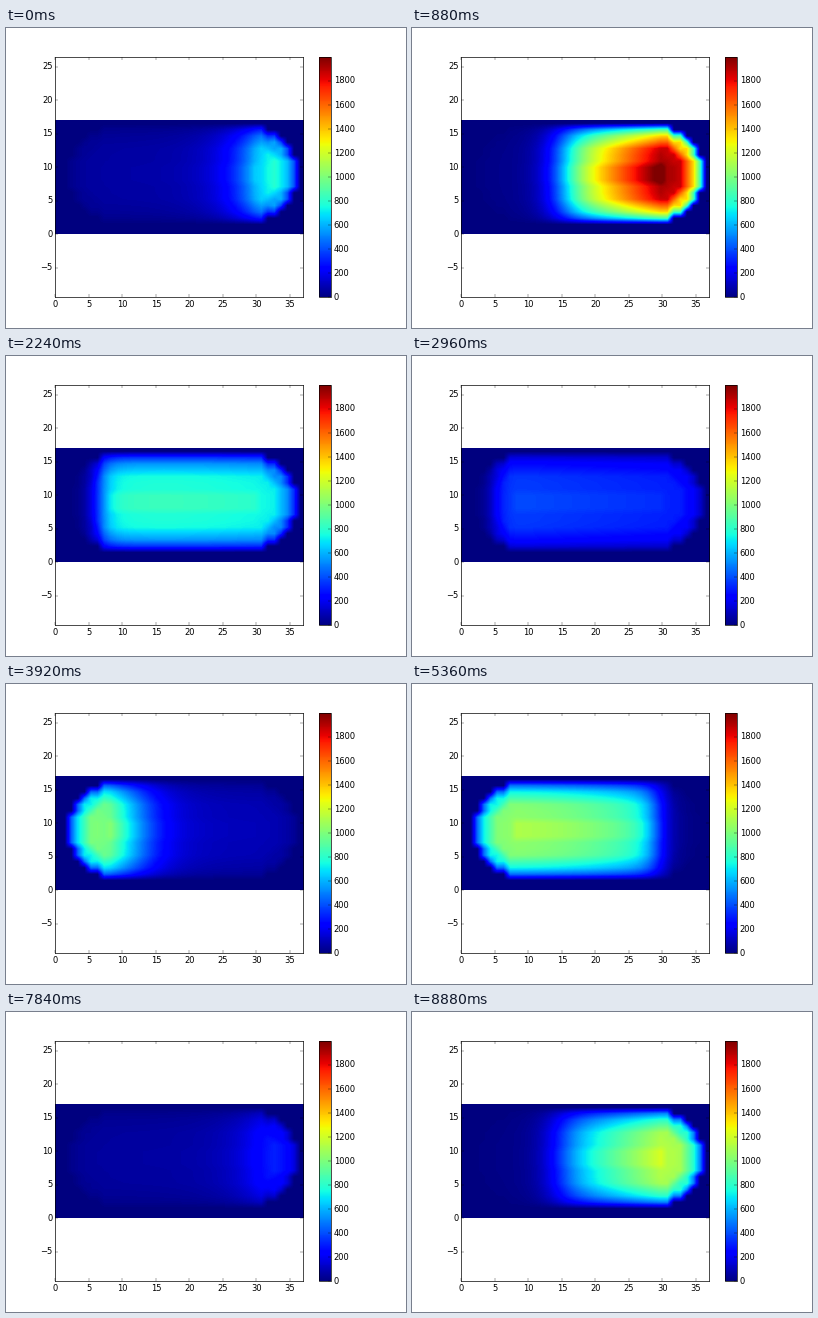
Animation of 400x300 px, one loop 8.96 s. Source, as a matplotlib script:

```python
import numpy as np
import matplotlib.pyplot as plt
from matplotlib.animation import FuncAnimation

plt.style.use("classic")
plt.rcParams.update({
    "figure.facecolor": "white",
    "savefig.dpi": "figure",
    "font.family": "DejaVu Sans",
})

FRAMES, INTERVAL = 112, 80
W, H = 400, 300
COLS, ROWS = 38, 18
MID_COL, MID_ROW = 19, 9
VMAX = 1996

# (start, peak) of each burst; they set off from left and right in turn
BURSTS = [(-50, 1500), (0, 2050), (46.3, 1540), (99.5, 1200)]

col = np.arange(COLS)
row = np.arange(ROWS)[:, None]


def capsule():
    """Static weight of each cell, falling in bands towards the rim."""
    over = np.maximum(np.abs(col - MID_COL) - 10, 0)
    depth = np.round(np.hypot(over, row - MID_ROW))
    band = (depth + 1) // 3
    return np.clip(1 - 0.07 * band - 0.86 * (depth / 8) ** 5, 0, 1)


def burst(age, peak, side):
    """Level along the length: a front slows down while the rest decays."""
    s = 11 + side * (col - MID_COL)
    front = 27 * (1 - np.exp(-age / 13))
    soft = 0.7 + 2.7 * np.exp(-age / 12)
    run = np.maximum(s, 0)
    level = peak * np.exp(-run / 32) / np.cosh((age - 12 - 0.4 * run) / 10)
    return level / (1 + np.exp((s - front) / soft))


MASK = capsule()


def field(t):
    return MASK * sum(burst(t - start, peak, (-1) ** n)
                      for n, (start, peak) in enumerate(BURSTS))


def add_axes(x, y, w, h):
    return fig.add_axes([x / W, y / H, w / W, h / H])


fig = plt.figure(figsize=(W / 50, H / 50), dpi=50)
ax = add_axes(49.4, 30.6, 248, 240)
image = ax.imshow(field(0), cmap="jet", vmin=0, vmax=VMAX, origin="lower",
                  extent=(0, 37, 0, 17), aspect="auto",
                  interpolation="bilinear")
half = 18.5 * 240 / 248
ax.set_xlim(0, 37)
ax.set_ylim(8.5 - half, 8.5 + half)
ax.set_xticks(range(0, 36, 5))
ax.set_yticks(range(-5, 26, 5))
fig.colorbar(image, cax=add_axes(312.9, 30.6, 12, 240),
             ticks=range(0, 1801, 200))


def update(i):
    image.set_data(field(i))
    return [image]


anim = FuncAnimation(fig, update, frames=FRAMES, interval=INTERVAL,
                     repeat=True, repeat_delay=0)
plt.show()
```
